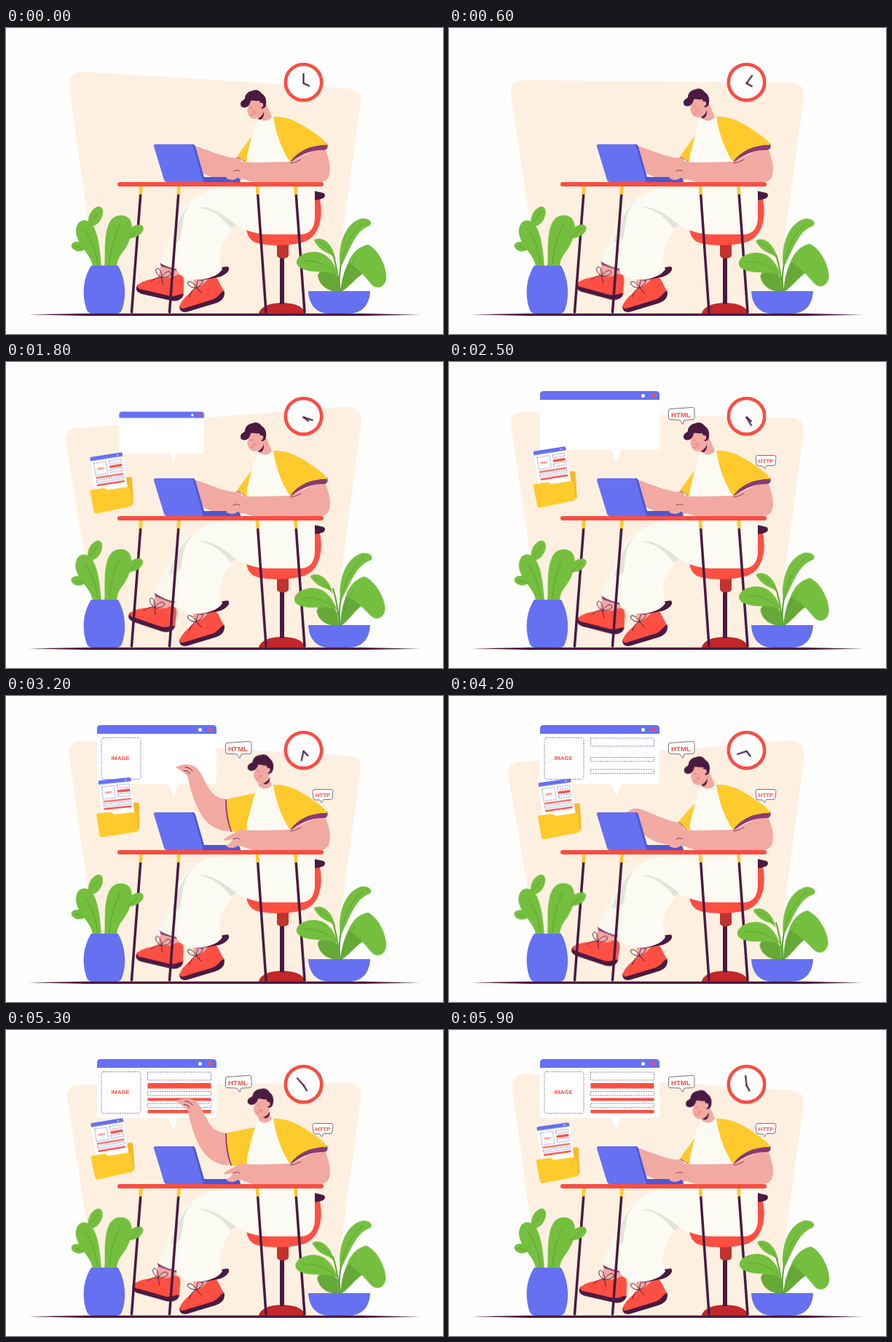
Write an HTML page that moves like this. It is 600 px wide and 421 px high and loops after 6000 ms.

```html
<!DOCTYPE html>
<html lang="en">
<head>
<meta charset="utf-8">
<title>Building a web page</title>
<style>
html, body { margin: 0; height: 100%; overflow: hidden; background: #fefefe; }
svg { display: block; width: 600px; height: 421px; }

:root {
  --blue: #6571f0; --red: #ff4f43; --plum: #4a1a40; --skin: #f2a9a2;
  --yellow: #ffca2b; --cloth: #fcfbf3; --leaf: #74bf3e; --stem: #5da336;
}
.blue { fill: var(--blue); } .red { fill: var(--red); } .plum { fill: var(--plum); }
.skin { fill: var(--skin); } .yellow { fill: var(--yellow); } .cloth { fill: var(--cloth); }
.leaf { fill: var(--leaf); } .shade { fill: #66a937; } .white { fill: #fff; } .cuff { fill: #8a3a72; }
.fold { fill: #e4e4d8; }
.line { fill: none; stroke: var(--plum); stroke-linecap: round; stroke-linejoin: round; }
.vein { fill: none; stroke: var(--stem); stroke-linecap: round; }
.dash { fill: none; stroke: #7478b4; stroke-width: .9; stroke-dasharray: 2 1.3; }
.bubble { fill: #fff; stroke: #6b626e; stroke-width: .9; }
text { font: bold 8px "Liberation Sans", Arial, sans-serif; fill: var(--red); text-anchor: middle; }

/* Idle sway: 3 s there and back */
.sway { animation: 1.5s cubic-bezier(.37, 0, .63, 1) infinite alternate; }
#wall { animation-name: wall; }
#leg { animation-name: leg; transform-origin: 265px 245px; }
.side { animation-name: side; transform-origin: 458px 362px; }
.tip { animation-name: tip; transform-origin: 459px 331px; }
.cactus { animation-name: cactus; transform-origin: 135px 327px; }
@keyframes wall {
  from { d: path("M87 82C85 68 92 59 106 60L470 83Q488 85 487 101L447 393H130Z"); }
  to { d: path("M81 113C79 102 84 95 98 94L466 59Q489 58 488 80L447 393H130Z"); }
}
@keyframes leg { to { transform: rotate(6.2deg); } }
@keyframes side { to { transform: rotate(-5deg); } }
@keyframes tip { to { transform: rotate(1.5deg); } }
@keyframes cactus { to { transform: rotate(-.8deg); } }

/* Story: one 6 s loop */
.act { animation: 6s ease-in-out infinite; }
#minute { animation: turn 6s linear infinite; }
#hour { animation: hour 6s linear infinite; }
#minute, #hour { transform-origin: 408.5px 76px; }
@keyframes turn { to { transform: rotate(360deg); } }
@keyframes hour { from { transform: rotate(116deg); } to { transform: rotate(153deg); } }

#arm { animation-name: arm; }
#sleeve { animation-name: sleeve; }
#hem { animation-name: hem; stroke: #8a3a72; }
#fingers { animation-name: fingers; }
#head { animation-name: head; transform-origin: 352px 118px; }
@keyframes arm {
  0%, 44%, 72.5%, 77%, 98%, to { d: path("M246 168C254 160 262 162 270 166C282 170 296 176 308 178C314 179 316 179 320 176L332 207C320 210 305 210 290 207C278 204 268 200 262 192C255 185 250 178 246 168Z"); }
  50%, 62%, 83%, 92% { d: path("M233 98C240 94 250 93 257 96C266 100 270 112 275 121C281 133 288 141 303 142L307 186C288 186 275 176 266 160C258 145 252 125 250 112C247 105 238 102 233 98Z"); }
}
@keyframes sleeve {
  0%, 44%, 72.5%, 77%, 98%, to { d: path("M338 148C332 156 326 164 317 177C322 178 325 181 328 184C330 184 333 184 335 183C337 168 338 158 338 148Z"); }
  50%, 62%, 83%, 92% { d: path("M346 133C331 136 316 139 302 142C302 156 304 172 309 187C318 187 325 186 333 183C335 168 341 150 346 133Z"); }
}
@keyframes hem {
  0%, 44%, 72.5%, 77%, 98%, to { d: path("M318 178C322 179 325 182 328 184"); stroke-width: .8; }
  50%, 62%, 83%, 92% { d: path("M302 143C302 156 304 172 309 186"); stroke-width: 1.8; }
}
@keyframes fingers {
  0%, 48%, 64%, 81%, 93%, to { opacity: 0; }
  50%, 62%, 83%, 92% { opacity: 1; }
}
@keyframes head {
  0% { transform: translateY(2px); }
  12%, 44%, 72%, 77% { transform: none; }
  50%, 62%, 83%, 92% { transform: translate(8px, -2px) rotate(6deg); }
  to { transform: translate(2px, 0) rotate(2deg); }
}

#folder { animation-name: folder; transform-origin: 153px 175px; }
#drift { animation-name: drift; transform-origin: 153px 175px; }
#sheet { animation-name: sheet; animation-timing-function: ease-out; }
#ink { animation-name: ink; }
#win { animation-name: win; transform-origin: 230px 138px; }
#html { animation-name: html; transform-origin: 320px 86px; }
#http { animation-name: http; transform-origin: 434px 148px; }
#image { animation-name: image; transform-origin: 158px 86px; }
#l1, #l2, #l3, #b1, #b2, #b3 { transform-origin: 195px 0; }
#l1 { animation-name: l1; } #l2 { animation-name: l2; } #l3 { animation-name: l3; }
#b1 { animation-name: b1; } #b2 { animation-name: b2; } #b3 { animation-name: b3; }
@keyframes folder { 0%, 10% { transform: scale(0); } 16%, to { transform: none; } }
@keyframes drift {
  0%, 20% { transform: translate(-7px, 18px) rotate(-1deg); animation-timing-function: linear; }
  41.7% { transform: translate(-6px, 3px) rotate(-1deg); }
  53.3% { transform: translate(2px, -2px) rotate(2deg); }
  70% { transform: none; }
  88.3% { transform: translate(-5px, 8px) rotate(-1.5deg); }
  to { transform: translate(-2px, 14px); }
}
@keyframes sheet { 0%, 15% { transform: translateY(46px); } 24%, to { transform: none; } }
@keyframes ink { 0%, 22% { opacity: 0; } 30%, to { opacity: 1; } }
@keyframes win { 0%, 25% { transform: scale(0); } 33%, to { transform: none; } }
@keyframes html { 0%, 32% { transform: scale(0); } 37%, to { transform: none; } }
@keyframes http { 0%, 35% { transform: scale(0); } 40%, to { transform: none; } }
@keyframes image { 0%, 47% { transform: scale(0); } 51%, to { transform: none; } }
@keyframes l1 { 0%, 55% { transform: scaleX(0); } 60%, to { transform: none; } }
@keyframes l2 { 0%, 58% { transform: scaleX(0); } 63%, to { transform: none; } }
@keyframes l3 { 0%, 61% { transform: scaleX(0); } 66%, to { transform: none; } }
@keyframes b1 { 0%, 78% { transform: scaleX(0); } 82%, to { transform: none; } }
@keyframes b2 { 0%, 81% { transform: scaleX(0); } 85%, to { transform: none; } }
@keyframes b3 { 0%, 84% { transform: scaleX(0); } 87%, to { transform: none; } }
</style>
</head>
<body>
<svg viewBox="0 0 600 421">
  <defs>
    <g id="shoe">
      <path class="plum" d="M0 -7Q-3 3 8 4H46Q63 5 65 -8L55 -20Z"/>
      <path class="red" d="M0 -6C5 -14 15 -18 24 -22C33 -25 41 -25 46 -29C50 -34 56 -35 59 -31C63 -24 62 -15 65 -8C60 -10 56 -2 46 -2H10Q0 -1 0 -6Z"/>
      <path class="line" stroke-width=".9" d="M30 -24C23 -25 18 -32 21 -35C25 -36 29 -30 30 -24C32 -32 38 -37 41 -33C42 -28 35 -25 30 -24L34 -15M30 -24C24 -24 20 -20 17 -15"/>
    </g>
  </defs>

  <path id="wall" class="sway" fill="#fef0e1"/>

  <g id="win" class="act">
    <path class="white" d="M125 46H289V116Q289 121 284 121H236L230 138L223 121H130Q125 121 125 116Z"/>
    <path class="blue" d="M125 52V45Q125 40 130 40H284Q289 40 289 45V52Z"/>
    <circle class="white" cx="266.500" cy="46.500" r="2.500"/>
    <circle class="red" cx="280" cy="46.500" r="2.500"/>
    <g id="image" class="act">
      <rect class="dash" x="131" y="57.500" width="54" height="57" rx="3"/>
      <text x="157" y="88" style="font-size:7.7px">IMAGE</text>
    </g>
    <rect id="l1" class="act dash" x="194.500" y="58" width="87" height="11"/>
    <rect id="l2" class="act dash" x="194.500" y="84.500" width="87" height="5.500"/>
    <rect id="l3" class="act dash" x="194.500" y="101" width="87" height="5.500"/>
    <rect id="b1" class="act red" x="194.500" y="73" width="87" height="7.500"/>
    <rect id="b2" class="act red" x="194.500" y="93.500" width="87" height="4"/>
    <rect id="b3" class="act red" x="194.500" y="110" width="87" height="4.500"/>
  </g>

  <g id="drift" class="act"><g id="folder" class="act">
    <path fill="#f5b921" d="M124 166L163 161L165 151Q165 149 167 149L177 147.500Q180 147.500 180 150L181.500 184L128 195Z"/>
    <g id="sheet" class="act">
      <g transform="translate(122.500 119.500) rotate(-8)">
        <rect class="white" width="45" height="55" rx="2"/>
        <g id="ink" class="act">
          <path class="blue" d="M0 5.500V2Q0 0 2 0H43Q45 0 45 2V5.500Z"/>
          <circle class="white" cx="38" cy="2.800" r=".9"/>
          <circle class="red" cx="41.500" cy="2.800" r=".9"/>
          <rect class="dash" x="4" y="9" width="17" height="17"/>
          <text x="12.500" y="18.500" style="font-size:3px">IMAGE</text>
          <path class="dash" d="M25 9H42V13H25ZM25 21H42V25H25ZM4 33H42V36H4Z"/>
          <path class="red" d="M25 15.500H42V19H25ZM4 28.500H42V30.500H4ZM4 38.500H42V41H4Z"/>
        </g>
      </g>
    </g>
    <path class="yellow" d="M122 167Q121.500 165 123.500 164.500L141 162Q143 162 146 165L174 161Q177 161 177 163L180 185Q180 187 177 188L131 197Q128 197 127 195Z"/>
  </g></g>

  <circle cx="408.500" cy="74.700" r="24.700" fill="#fff" stroke="#f94d43" stroke-width="4.600"/>
  <path id="minute" class="line" stroke-width="2.100" d="M408.500 76V63"/>
  <path id="hour" class="line" stroke-width="2.200" d="M408.500 76V67.500"/>

  <g id="html" class="act">
    <path class="bubble" d="M304 64.500L334 62.500Q337 62.500 337 65V77Q337 79.500 334 79.500L323 80L321 85.500L317 80L304 79.500Q302 79.500 301.500 77V67Q301 65 304 64.500Z"/>
    <text x="318.500" y="75.500" style="font-size:9.7px">HTML</text>
  </g>
  <g id="http" class="act">
    <path class="bubble" d="M424 128.500H446Q449 128.500 449 131.500L448 140Q448 142.500 445 142.500H436L433.500 147L431 143H425Q422 143 422 140L421 131.500Q421 129 424 128.500Z"/>
    <text x="435" y="138.700">HTTP</text>
  </g>

  <!-- chair -->
  <path fill="#c1272b" d="M347 393Q350 379 379 378Q408 379 411 393Z"/>
  <path class="plum" d="M376 296H382V380H376Z"/>
  <path fill="#c1332e" d="M372 296H388V313Q387 317 380 317Q373 317 372 313Z"/>
  <path class="red" d="M330 276H400Q424 274 424 236H431C436 262 430 286 410 294C388 301 352 300 340 294Q331 288 330 276Z"/>
  <path class="plum" d="M418 223L436 227Q440 230 436 234Q428 238 418 236Z"/>

  <!-- far leg -->
  <g id="leg" class="sway">
    <path class="skin" d="M214 322L240 328L236 350L208 346Z"/>
    <path class="cuff" d="M211 322L242 332L238 335L213 328Z"/>
    <path fill="#f8f8ee" d="M285 222C255 232 240 245 235 262L211 323Q226 332 244 333L285 250Z"/>
    <path class="fold" d="M256 238C240 254 232 276 228 296C236 296 242 290 250 280Z"/>
    <use href="#shoe" transform="translate(179 360) rotate(13)"/>
  </g>

  <!-- near leg -->
  <path class="skin" d="M257 340L284 338L288 354Q272 364 258 358Z"/>
  <use href="#shoe" transform="translate(240 389) rotate(-17)"/>
  <path class="cuff" d="M250 343L290 338L268 348Z"/>
  <path class="plum" d="M268 347C280 337 296 327 305 328.500C309 332 303 340 291 343Z"/>
  <path class="cloth" d="M300 219C270 222 250 238 244 260C239 288 237 315 234 333C241 344 252 347 270 346C285 343 292 339 297 332C291 318 292 295 315 271C330 279 345 284 360 284H405Q423 283 424 262V219Z"/>
  <path class="fold" d="M264 247C281 244 300 258 316 271L309 276C298 262 284 249 264 247Z"/>

  <!-- raising arm -->
  <path id="arm" class="act skin"/>
  <path id="fingers" class="act line" stroke-width=".9" d="M246 98Q252 98 256 103M244 103Q249 101 252 107"/>
  <path id="sleeve" class="act yellow"/>
  <path id="hem" class="act line"/>

  <!-- body and head -->
  <path class="cloth" d="M347 123C340 135 336 155 331 175L329 213H395V186C380 165 372 145 368 123Z"/>
  <path class="skin" d="M345 112L357 104L365 122C361 129 351 129 347 124Z"/>
  <g id="head" class="act">
    <path class="plum" d="M345 123C350 121 353 117 354 113Q355 122 349 124Z"/>
    <path class="skin" d="M334 96C334 104 330 111 332 115C334 120 337 123 342 123C347 122 351 118 353 111L354 95Z"/>
    <path class="plum" d="M322 103C322 98 326 98 328 95C328 89 333 85 338 84.500C342 82 348 83 351 88C356 91 358 97 357 102C357 107 354 109 351 109L348 98C344 99 339 97 336 98C335 104 331 108 327 107.500C324 107 322 106 322 103Z"/>
    <circle class="skin" cx="350" cy="104" r="3.200"/>
    <ellipse cx="341" cy="113.500" rx="3" ry="2.500" fill="#f6938b"/>
    <path fill="none" stroke="#c9706f" stroke-width=".8" d="M335 107Q337 109 339 107M335 117Q338 119 340 117"/>
  </g>

  <!-- laptop -->
  <path fill="#4b58d6" d="M268 205H316Q322 206 322 212H268ZM250 160H257Q259 160 260 163L274 212H262Z"/>
  <path class="blue" d="M203 163Q202 160 206 160H254Q256 160 257 163L271 212H221Q218 212 217 209Z"/>

  <!-- resting arm -->
  <path class="skin" d="M298 198C304 192 312 190 321 184C345 186 368 184 390 184L437 162C442 178 447 188 444 202Q442 211 432 212H340C330 210 324 206 318 206C312 211 306 209 302 206C308 203 310 199 312 197C306 197 302 200 298 198Z"/>
  <path class="line" stroke-width=".7" d="M312 197Q318 194 321 197M391 186Q398 185 405 181"/>
  <path class="cuff" d="M441 159C443 166 440 168 434 168C418 167 403 176 390 185L398 168Z"/>
  <path class="yellow" d="M367 122C384 121 401 129 414 138C427 147 437 153 441 161C420 160 402 168 390 184C380 170 371 148 367 122Z"/>

  <!-- table -->
  <path class="line" stroke-width="3.500" d="M185.500 219L172.500 391M237.500 219L224.500 391M345 219L357 391M397.500 219L410 391"/>
  <path fill="none" stroke="#ffca2b" stroke-width="4.600" d="M185.500 217L184.600 229M237.500 217L236.600 229M345 217L345.800 229M397.500 217L398.300 229"/>
  <path fill="none" stroke="#fb4c42" stroke-width="6" stroke-linecap="round" d="M156 215H433"/>

  <!-- cactus -->
  <g class="sway cactus">
    <ellipse class="leaf" cx="123" cy="259" rx="8.500" ry="14.500" transform="rotate(28 123 259)"/>
    <ellipse class="leaf" cx="99" cy="300.500" rx="9.500" ry="6.500" transform="rotate(10 99 301)"/>
    <path class="leaf" d="M119 328C118 312 96 298 96 279C97 264 108 261 116 268C126 278 129 300 131 328Z"/>
    <ellipse class="leaf" cx="177" cy="280" rx="13" ry="7.500" transform="rotate(-32 177 280)"/>
    <path class="leaf" d="M135 328C137 318 133 285 142 268C147 256 162 255 169 262C177 272 172 292 162 306C154 316 153 320 152 328Z"/>
    <path class="vein" d="M108 277Q122 295 126 325M157 270Q144 295 142 325M126 254Q121 263 115 267M182 276Q175 285 167 289M95 300Q102 301 107 305"/>
  </g>
  <path class="blue" d="M117 327H154C164 345 166 370 159 388Q157 393 151 393H119Q113 393 111 388C104 370 105 345 117 327Z"/>

  <!-- potted plant -->
  <path class="vein" stroke-width="2" d="M459 364Q456 345 460 325M458 364Q455 330 449 312"/>
  <g class="sway tip">
    <path class="leaf" d="M459 331C455 305 462 270 488 262C500 261 504 268 499 272C480 279 474 300 459 331Z"/>
    <path class="vein" d="M459 330Q467 286 490 269"/>
  </g>
  <g class="sway side">
    <path class="leaf" d="M452 317C445 308 432 310 423 292C430 286 448 292 452 317Z"/>
    <path class="shade" d="M457 364C445 362 430 357 428 340C434 328 447 328 456 344Z"/>
    <path class="leaf" d="M456 340C440 333 420 338 406 331C396 326 397 318 406 312C425 303 447 308 456 340Z"/>
    <path class="shade" d="M459 364C462 330 476 304 497 299C488 318 492 330 490 338C480 344 472 356 459 364Z"/>
    <path class="leaf" d="M470 322C476 308 486 300 497 298C511 304 524 330 522 346C519 357 511 359 504 355C495 346 488 333 470 322Z"/>
    <path class="vein" d="M459 363Q466 335 480 316M457 362Q449 346 436 338M456 340Q438 320 410 320M452 317Q442 300 428 294"/>
  </g>
  <path class="blue" d="M415 362H500C499 382 488 393 470 393H444C427 393 416 382 415 362Z"/>

  <path class="plum" d="M31 394.200L110 392.800H490L569 394.500L490 396H110Z"/>
</svg>
</body>
</html>
```
